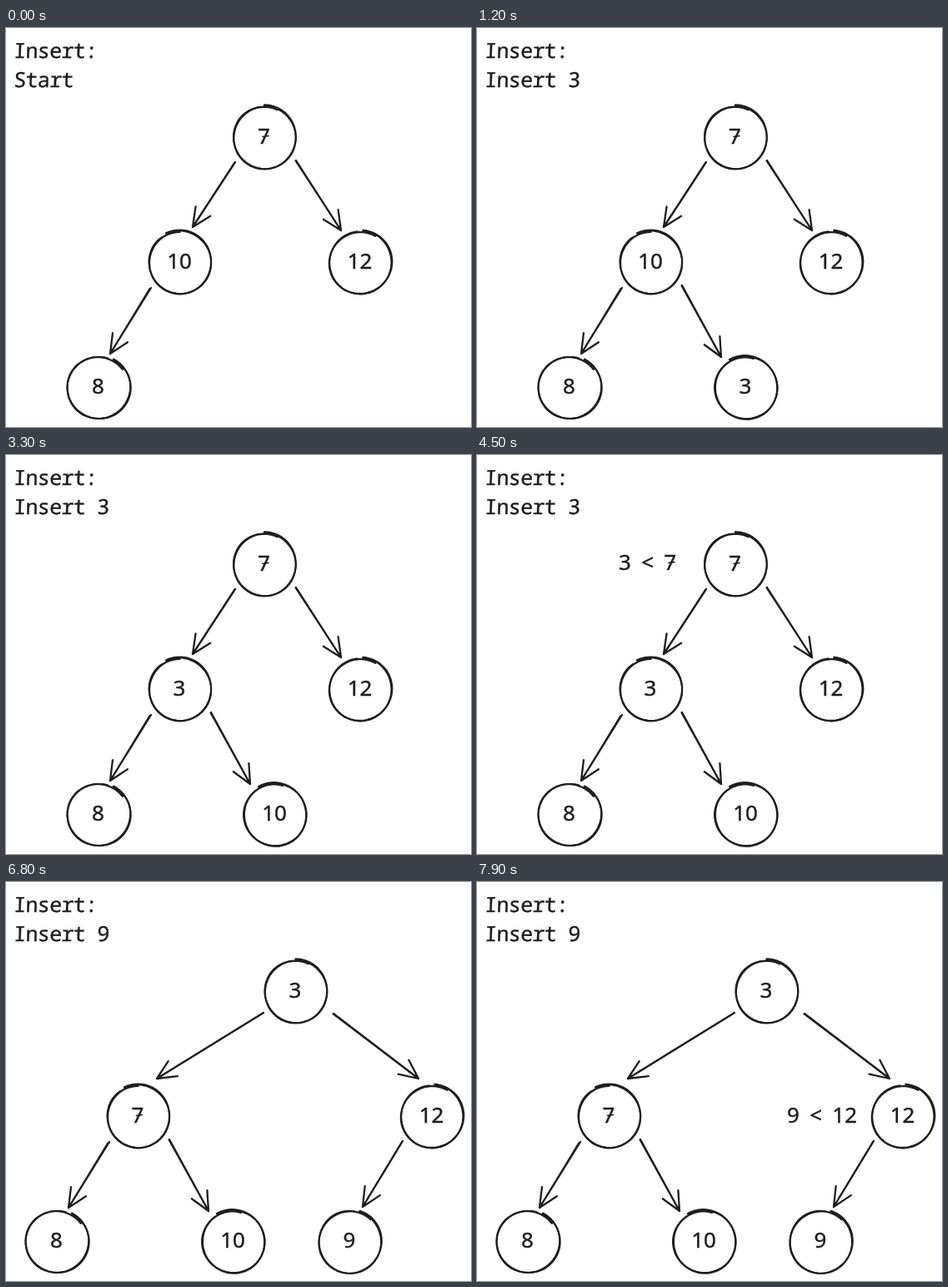
These frames come from a looping animation (558 px wide and 479 px high, 8 s). An HTML page:

```html
<!DOCTYPE html>
<html lang="en">
<head>
<meta charset="utf-8">
<title>Heap insert</title>
<style>
  html, body { margin: 0; width: 100%; height: 100%; overflow: hidden; background: #fff; }
  svg { display: block; width: 100%; height: 100%; }
  path { fill: none; stroke: #1e1e1e; stroke-width: 2.3; stroke-linecap: round; stroke-linejoin: round; }
  .thin { stroke-width: 1.6; }
  text { fill: #1e1e1e; stroke: #1e1e1e; stroke-width: .4px; font: 26px "Noto Sans", sans-serif; white-space: pre; }
  .title { font: 25px "Noto Sans Mono", monospace; letter-spacing: -.7px; }
  .node { text-anchor: middle; }
  .compare { word-spacing: 5.5px; }
</style>
</head>
<body>
<svg id="stage" viewBox="0 0 558 479"></svg>
<script>
const LOOP = 8000;
const stage = document.getElementById('stage');
const stroke = (d, cls = '') => `<path class="${cls}" d="${d}"/>`;
const point = (x, y) => `${x.toFixed(1)} ${y.toFixed(1)}`;
const rad = degrees => degrees * Math.PI / 180;

// Hand-drawn circle: the radius wobbles and the line overshoots its start.
function ring(cx, cy, start, overlap) {
  const pass = (wobble, phase, drift, sweep) => {
    const points = [];
    for (let i = 0; i <= 60; i++) {
      const t = i / 60;
      const a = rad(start + t * sweep);
      const r = 37.5 + wobble * Math.sin(2 * a + phase) + drift * (0.5 - t);
      points.push(point(cx + r * Math.cos(a), cy + r * Math.sin(a)));
    }
    return 'M' + points.join('L');
  };
  return stroke(pass(0.4, start, 2.4, 360 + overlap)) +
    stroke(pass(0.6, start + 2, 1.2, 350), 'thin');
}

const sevenBar = (x, y) => stroke(`M${x - 2} ${y + 0.5}L${x + 5} ${y - 0.5}`, 'thin');

function node(label, cx, cy, start, overlap = 25) {
  return ring(cx, cy, start, overlap) +
    `<text class="node" x="${cx - 0.5}" y="${cy + 7}">${label}</text>` +
    (label === 7 ? sevenBar(cx, cy - 1.5) : '');
}

function arrow(x1, y1, x2, y2, gap = 0.8) {
  const back = Math.atan2(y1 - y2, x1 - x2);
  const barb = turn => {
    const a = back + rad(turn);
    return `M${point(x2 + 25 * Math.cos(a), y2 + 25 * Math.sin(a))}L${x2} ${y2}`;
  };
  return stroke(`M${x1} ${y1}L${x2} ${y2}${barb(-25)}${barb(25)}`) +
    stroke(`M${x1 - gap} ${y1 + gap / 2}L${x2} ${y2}`, 'thin');
}

const title = line => ['Insert:', line].map((text, i) =>
  `<text class="title" transform="translate(9 ${36 + 35 * i}) skewX(-2)">${text}</text>`).join('');

const compare = (text, x, y) =>
  `<text class="compare" x="${x}" y="${y}">${text}</text>`;

// Left subtree; dx moves it as a whole.
const leftTree = (dx, parent, left, right) =>
  node(parent, 208.5 + dx, 281.5, -115) +
  arrow(174 + dx, 312, 125 + dx, 391, 1.8) +
  node(left, 111 + dx, 431.5, -62) +
  (right === undefined ? '' :
    arrow(246 + dx, 309, 293 + dx, 395) + node(right, 322.5 + dx, 432, -120, 45));

const narrowTree = (parent, right) =>
  node(7, 310, 131.5, -90) +
  arrow(275, 161, 224, 239) + arrow(348, 159, 402, 243) +
  node(12, 425, 281.5, -85) + leftTree(0, parent, 8, right);

const wideTree = (tipX, tipY) =>
  node(3, 347.5, 131.5, -90) +
  arrow(309, 157, tipX, tipY) + arrow(393, 158, 495, 236) +
  node(12, 511, 281.5, -85) + leftTree(-50, 7, 8, 10);

const withThree = title('Insert 3') + narrowTree(10, 3);
const swapped = title('Insert 3') + narrowTree(3, 10);
const withNine = title('Insert 9') + wideTree(181, 236) +
  arrow(476, 311, 428, 390) + node(9, 412.5, 432, -72);

const steps = [
  [0, title('Start') + narrowTree(10)],
  [1200, withThree],
  [2300, withThree + compare('3 &lt; 10', 72, 288.5)],
  [3300, swapped],
  [4500, swapped + compare('3 &lt; 7', 170, 138) + sevenBar(232, 129)],
  [5500, title('Insert 3') + wideTree(185, 238)],
  [6800, withNine],
  [7900, withNine + compare('9 &lt; 12', 372, 288.5)]
];

stage.innerHTML = steps.map(([from, content]) =>
  `<g opacity="${from ? 0 : 1}">${content}</g>`).join('');

// Each step is shown from its own time until the next one starts.
steps.forEach(([from], i) => {
  const to = i + 1 < steps.length ? steps[i + 1][0] : LOOP;
  const key = (time, opacity) => ({ offset: time / LOOP, opacity, easing: 'step-end' });
  const keys = [key(from, 1), key(to, 0)];
  if (from > 0) keys.unshift(key(0, 0));
  if (to < LOOP) keys.push(key(LOOP, 0));
  stage.children[i].animate(keys, { duration: LOOP, iterations: Infinity });
});
</script>
</body>
</html>
```
